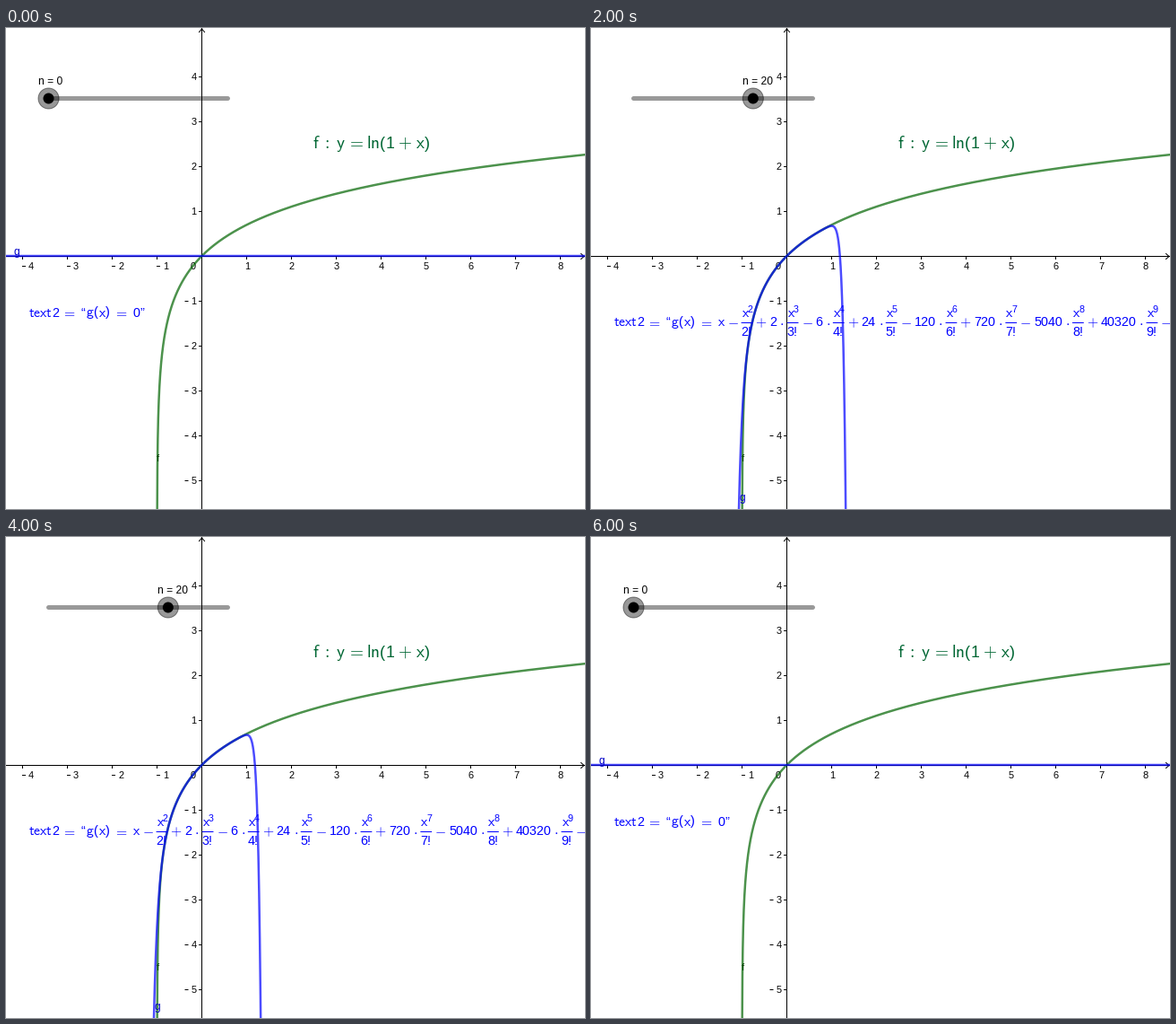
These frames come from a looping animation (646 by 536 pixels, 6100 ms). A matplotlib script:

```python
import math

import matplotlib.pyplot as plt
import numpy as np
from matplotlib.animation import FuncAnimation
from matplotlib.patches import Circle

W, H, DPI = 646, 536, 64
PT = 72 / DPI                      # points per pixel
OX, OY, UNIT = 218.5, 254.5, 50    # axis centre lines and scale
CURVE_Y = 254                      # height of y = 0 for the curves
N_MAX = 30
EM = 15.7                          # size of the series formula
LOW, HIGH = 321.5, 332             # formula baselines without / with fractions
BLUE, GREEN, TITLE = "#0000ff", "#006400", "#006633"

plt.rcParams["font.family"] = "Liberation Sans"
plt.rcParams["mathtext.fontset"] = "cm"

fig = plt.figure(figsize=(W / DPI, H / DPI), dpi=DPI, facecolor="white")
ax = fig.add_axes([0, 0, 1, 1])
ax.set_xlim(0, W)
ax.set_ylim(H, 0)
ax.axis("off")


def line(xs, ys, width=1, color="black", **kw):
    return ax.plot(xs, ys, lw=width * PT, color=color, snap=False, **kw)[0]


def text(x, y, s, size, color="black", ha="left", z=6):
    return ax.text(x, y, s, size=size * PT, color=color, ha=ha,
                   va="baseline", zorder=z)


def sans(x, y, s, size=EM, color=BLUE, ha="left"):
    """Letters and operators in the maths sans face."""
    return text(x, y, rf"$\mathsf{{{s}}}$", size, color, ha)


def plain(x, y, s, size=EM, color=BLUE):
    """Digits and brackets, which the maths face would set with serifs."""
    return text(x, y, s, 0.92 * size, color)


def tick_label(x, y, value):
    """Digit centred on x, with a detached minus sign."""
    text(x, y, str(abs(value)), 11, ha="center", z=3)
    if value < 0:
        line([x - 10, x - 6], [y - 3.5] * 2, solid_capstyle="butt", zorder=3)


def draw_axes():
    line([0, W], [OY, OY], zorder=2)
    line([OX, OX], [0, H], zorder=2)
    line([OX - 3, OX, OX + 3], [4.5, 1, 4.5], zorder=2)
    line([W - 4.5, W - 1, W - 4.5], [OY - 3, OY, OY + 3], zorder=2)
    for v in range(-4, 9):
        if v:
            x = OX + UNIT * v
            line([x, x], [OY, OY + 3], zorder=2)
            tick_label(x + (9.5 if v < 0 else 0.5), 269, v)
    for v in range(-5, 5):
        if v:
            y = OY - UNIT * v
            line([OX - 3, OX], [y, y], zorder=2)
            tick_label(209.5, y + 3.5, v)
    tick_label(208.5, 269, 0)


def draw_log():
    x = np.concatenate([-1 + np.geomspace(1e-3, 1, 600),
                        np.linspace(0, 8.7, 600)[1:]])
    line(OX + UNIT * x, CURVE_Y - UNIT * np.log1p(x), 2.5, GREEN,
         alpha=0.7, zorder=4)
    text(168, 483, "f", 11, "#004000")
    for x, s in [(342, "f"), (368.3, "y"), (402.3, "ln"), (456.8, "x")]:
        sans(x, 133.5, s, 19.3, TITLE)
    for x, s in [(357, ":"), (389.5, "="), (445.3, "+")]:
        sans(x, 133.5, s, 19.3, TITLE, "center")
    for x, s in [(416.8, "("), (423.5, "1"), (466.8, ")")]:
        plain(x, 133.5, s, 19.3, TITLE)


def build_terms():
    """Return artists of each series term and its right edge."""
    frac_w = 0.811 * EM
    right = 141.2 + 0.461 * EM
    terms, edges = {}, {1: right}
    for k in range(2, 11):
        sign = "-" if k % 2 == 0 else "+"
        parts = [sans(right + 0.611 * EM, HIGH, sign, ha="center")]
        left = right + 1.222 * EM
        if k > 2:
            coef = str(math.factorial(k - 1))
            parts.append(plain(left, HIGH, coef))
            left += 0.5 * len(coef) * EM
            parts.append(sans(left + 0.361 * EM, HIGH, r"\cdot", ha="center"))
            left += 0.722 * EM
        right = left + frac_w
        parts += [
            sans(left, 322, "x"),
            plain(left + 0.461 * EM, 317, str(k), 0.74 * EM),
            line([left, right], [328.5, 328.5], 1, BLUE, zorder=6,
                 solid_capstyle="butt"),
            plain(left, 343, f"{k}!"),
        ]
        terms[k], edges[k] = parts, right
    return terms, edges


draw_axes()
draw_log()

# Slider
SLIDE_X, SLIDE_Y, SLIDE_W = 47.5, 78.5, 200
line([SLIDE_X, SLIDE_X + SLIDE_W], [SLIDE_Y] * 2, 5, alpha=0.4,
     solid_capstyle="round", zorder=7)
knob = [
    Circle((0, 0), 11.5, fc=(0, 0, 0, 0.4), ec=(0, 0, 0, 0.45), lw=PT, zorder=8),
    Circle((0, 0), 6, fc="black", ec="none", zorder=9),
]
for part in knob:
    ax.add_patch(part)
n_text = text(0, 63, "", 12, z=9)

# Series formula
head = [
    sans(25, LOW, "text"),
    plain(51.5, LOW, "2"),
    sans(70, LOW, "=", ha="center"),
    plain(84, LOW, "\u201c"),
    sans(89, LOW, "g"),
    plain(97, LOW, "("),
    sans(103, LOW, "x"),
    plain(111, LOW, ")"),
    sans(127.7, LOW, "=", ha="center"),
]
zero = plain(141.2, LOW, "0")
first = sans(141.2, HIGH, "x")
close = plain(0, LOW, "\u201d")
terms, edges = build_terms()

# Partial sum curve
px = np.linspace(-2, W + 2, 4200)
gx = (px - OX) / UNIT
g_line = line(px, px, 2.5, BLUE, alpha=0.7, zorder=5)
g_label = text(0, 0, "g", 12, "#0000c8")


def partial_sum(n):
    total = np.zeros_like(gx)
    for k in range(1, n + 1):
        total -= (-gx) ** k / k
    return np.clip(CURVE_Y - UNIT * total, -1500, 2000)


def update(frame):
    n = N_MAX - abs(N_MAX - frame)

    x = SLIDE_X + SLIDE_W * n / N_MAX
    for part in knob:
        part.center = (x, SLIDE_Y)
    n_text.set_text(f"n = {n}")
    n_text.set_x(x - 11.5)

    base = HIGH if n > 1 else LOW
    for part in head + [first, close]:
        part.set_y(base)
    zero.set_visible(n == 0)
    first.set_visible(n > 0)
    close.set_x(edges[min(max(n, 1), 10)] + 0.5)
    for k, parts in terms.items():
        for part in parts:
            part.set_visible(k <= n)

    py = partial_sum(n)
    g_line.set_ydata(py)
    i = np.argmax((px >= 0) & (py <= H))
    g_label.set_position((max(px[i], 8.3), min(py[i] - 1, 527)))
    return []


anim = FuncAnimation(fig, update, frames=2 * N_MAX + 1, interval=100,
                     init_func=lambda: update(0), repeat=True,
                     repeat_delay=0, blit=False)
plt.show()
```
